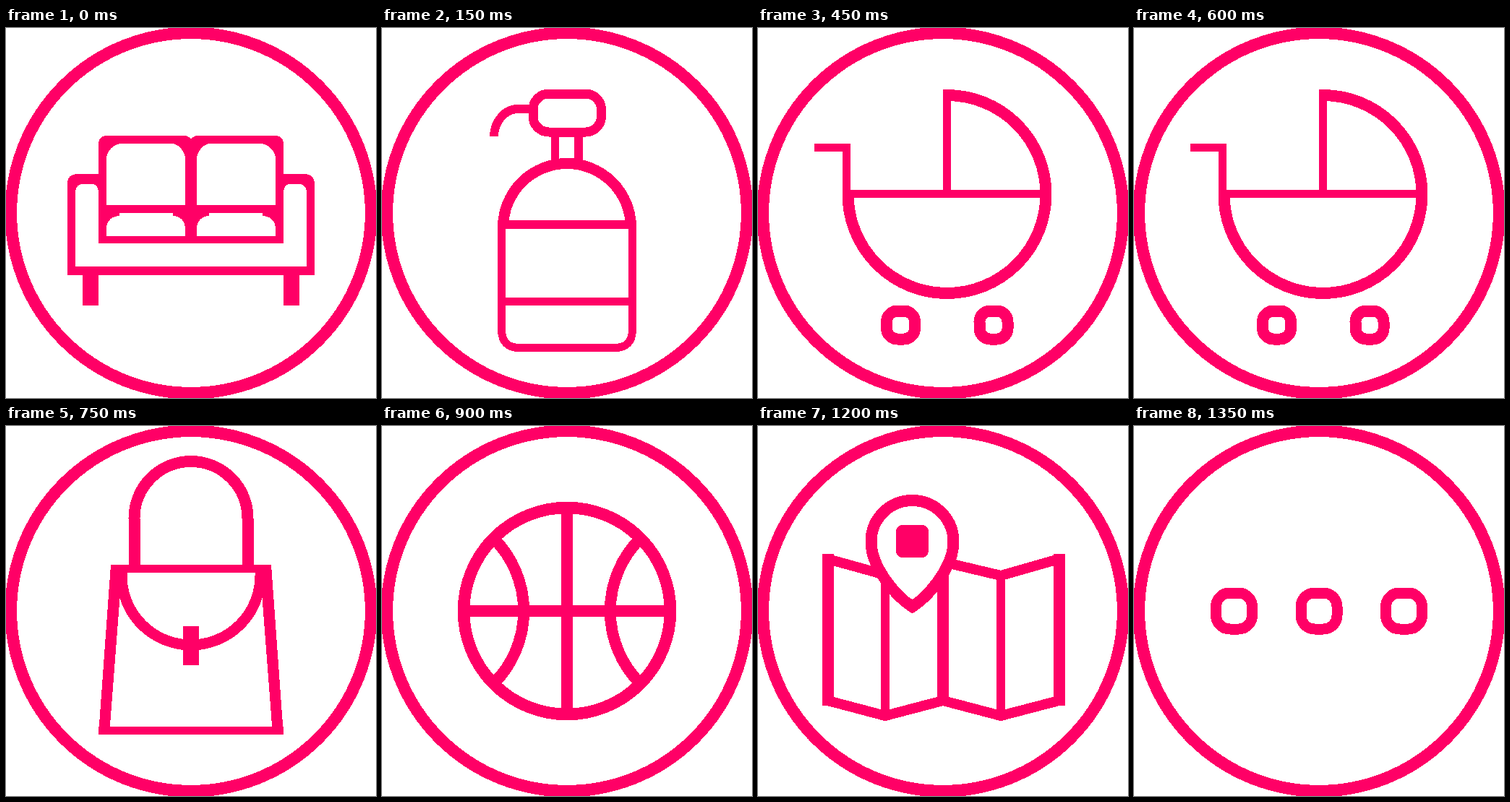
These frames come from a looping animation (512x512 px, 1500 ms). An HTML page:

```html
<!DOCTYPE html>
<html lang="en">
<head>
<meta charset="utf-8">
<title>Category icons</title>
<style>
  html, body { margin: 0; width: 100%; height: 100%; overflow: hidden; background: #fff; }
  svg { display: block; width: 100vw; height: 100vh; shape-rendering: crispEdges; }
  .line { fill: none; stroke: #f06; }
  .ink { fill: #f06; }
  .paper { fill: #fff; }
</style>
</head>
<body>
<svg viewBox="0 0 512 512">
  <circle class="line" cx="256" cy="256" r="249.2" stroke-width="16.6"/>
  <g id="icon"></g>
</svg>
<script>
const LOOP = 1500;
const line = (d, width = 16) => `<path class="line" d="${d}" stroke-width="${width}"/>`;
const ink = d => `<path class="ink" d="${d}"/>`;
const paper = d => `<path class="paper" d="${d}"/>`;
const box = (x, y, w, h, rx, width) =>
  `<rect class="line" x="${x}" y="${y}" width="${w}" height="${h}" rx="${rx}" stroke-width="${width}"/>`;
const mirror = shape => shape + `<g transform="matrix(-1 0 0 1 512 0)">${shape}</g>`;

const sofa = mirror(
  ink('M85 342V216Q85 202 99 202H128V161Q128 149 140 149H246Q252 149 256 153V342Z') +
  paper('M96 330V226Q98 216 106 216H120Q126 216 128 226V298H256V330Z') +
  paper('M139 245V178Q143 164 157 160H232Q244 164 248 178V245Z') +
  paper('M139 288V276Q141 261 157 260V256H231V260Q246 261 248 276V288Z') +
  ink('M106 342H128V384H106Z'));

const bottle =
  box(209, 91, 94.5, 53, 22, 13) +
  line('M204 112H188C170 112 155 130 155 150', 12) +
  line('M239.5 149V184M272 149V184', 11.5) +
  line('M167.5 276A88.5 88.5 0 0 1 344.5 276', 15) +
  line('M165.5 266V418Q166 442.5 190 442.5H322Q346 442.5 346.5 418V266', 11) +
  line('M166 272H346M166 378.5H346', 11.5);

const pram =
  line('M78 165.5H122.5V229.5H398M261.5 85V230', 11) +
  line('M261.5 93A137 137 0 0 1 398.5 230A137 137 0 0 1 124.5 230') +
  [197.5, 326].map(x => box(x - 19.5, 391.5, 39, 39, 15, 16)).join('');

const bag =
  line('M177.5 193V127.5A78.5 78.5 0 0 1 334.5 127.5V193') +
  ink('M145 192H367V203H145ZM128 416H384V427H128ZM245 277H267V331H245Z') +
  mirror(ink('M145 192H161L143 427H128Z')) +
  line('M160 203V207A96 96 0 0 0 352 207V203', 15);

const ball =
  line('M113 256A143 143 0 0 1 399 256A143 143 0 0 1 113 256Z', 16.5) +
  line('M256 112V400M112 256H400') +
  mirror(line('M155 156A142 142 0 0 1 155 356'));

const pin = 'M213.5 250C190 235 156.5 195 156.5 160A57 57 0 0 1 270.5 160C270.5 195 237 235 213.5 250Z';
const map =
  line('M96.5 184L176 206L256 188L336 207L416.5 184', 14) +
  line('M96.5 380L176 401L256 380L336 401L416.5 380', 14) +
  line('M96.5 177V387M256 188V385M416.5 177V387') +
  line('M176 206V403M336 205V403', 12) +
  paper(pin) + line(pin) +
  '<rect class="ink" x="191" y="137" width="45" height="45" rx="9"/>';

const dots = [138.5, 256, 373.5].map(x => box(x - 25, 231, 50, 50, 19, 15)).join('');

const scenes = [
  [0, sofa], [150, bottle], [450, pram], [750, bag],
  [900, ball], [1050, map], [1350, dots]
];

const icon = document.getElementById('icon');
const origin = performance.now();
let shown;

function draw(time) {
  const [, shape] = scenes.findLast(([start]) => start <= time);
  if (shape !== shown) icon.innerHTML = shown = shape;
}

function tick() {
  draw((performance.now() - origin) % LOOP);
  requestAnimationFrame(tick);
}
tick();
</script>
</body>
</html>
```
